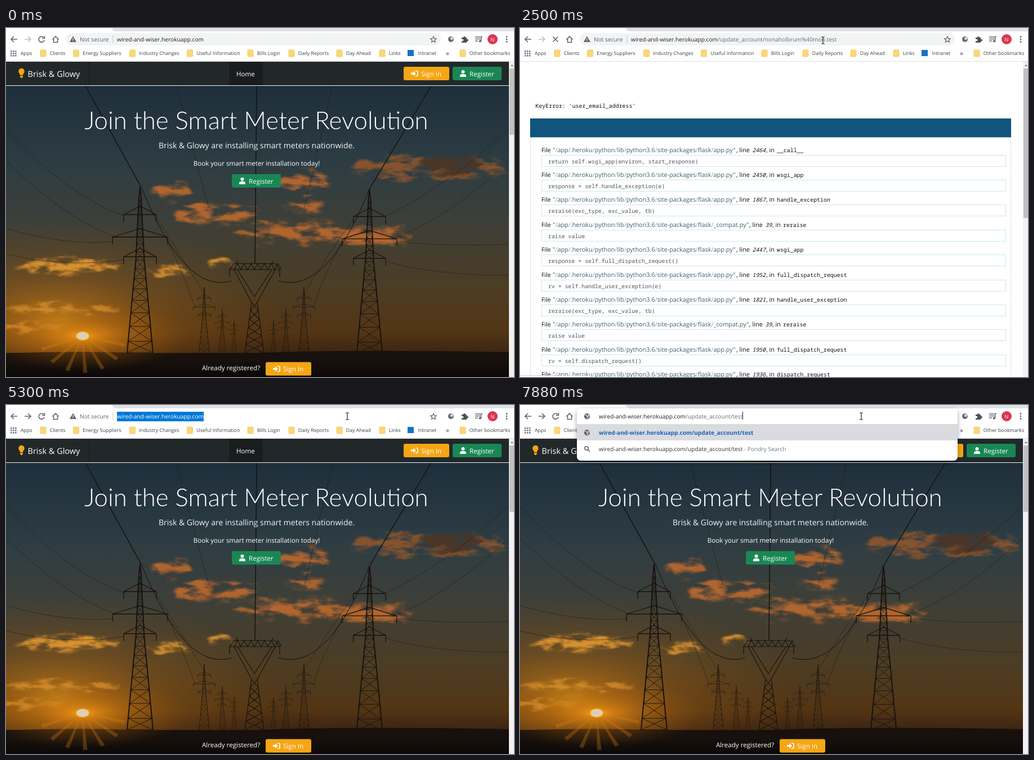
An HTML page for the animation above (8000 ms loop, 902x621 px).

```html
<!DOCTYPE html>
<html lang="en">
<head>
<meta charset="utf-8">
<title>Browser session</title>
<style>
html, body { margin: 0; width: 100%; height: 100%; overflow: hidden; background: #fff; }
svg { display: block; }
text { font-family: "Open Sans", "Noto Sans", sans-serif; text-rendering: geometricPrecision; white-space: pre; }
.mono { font-family: "Noto Sans Mono", "DejaVu Sans Mono", monospace; }
.title { font-family: Lato, "Open Sans", sans-serif; font-weight: 300; }
.line { fill: none; stroke: #5f6368; stroke-width: 1.6; }
</style>
</head>
<body>
<svg id="stage" width="902" height="621" viewBox="0 0 902 621">
  <defs>
    <linearGradient id="sky" x2="0" y2="1">
      <stop offset="0" stop-color="#1e2f3c"/><stop offset=".3" stop-color="#2e3d43"/>
      <stop offset=".52" stop-color="#3e3f38"/><stop offset=".75" stop-color="#4c3d25"/>
      <stop offset=".92" stop-color="#533514"/><stop offset="1" stop-color="#3a2412"/>
    </linearGradient>
    <linearGradient id="ground" x2="0" y2="1">
      <stop offset="0" stop-color="#1e150f"/><stop offset="1" stop-color="#0b0908"/>
    </linearGradient>
    <radialGradient id="glow">
      <stop offset="0" stop-color="#ffb01c"/><stop offset=".15" stop-color="#ee8f12" stop-opacity=".8"/>
      <stop offset=".45" stop-color="#c9740f" stop-opacity=".42"/><stop offset="1" stop-color="#94540c" stop-opacity="0"/>
    </radialGradient>
    <filter id="ragged" x="-20%" y="-80%" width="140%" height="260%">
      <feTurbulence type="fractalNoise" baseFrequency=".025 .06" numOctaves="4" seed="4" result="noise"/>
      <feColorMatrix in="noise" values="0 0 0 0 0  0 0 0 0 0  0 0 0 0 0  0 0 4 0 -1.2" result="wisps"/>
      <feGaussianBlur in="SourceGraphic" stdDeviation="3"/>
      <feDisplacementMap in2="noise" scale="32" xChannelSelector="R" yChannelSelector="G"/>
      <feComposite in2="wisps" operator="in"/>
    </filter>
    <filter id="shadow" x="-5%" y="-20%" width="110%" height="150%">
      <feDropShadow dx="0" dy="3" stdDeviation="4" flood-opacity=".35"/>
    </filter>
    <clipPath id="view"><rect y="60" width="893" height="561"/></clipPath>
  </defs>
  <g id="home" clip-path="url(#view)"></g>
  <g id="trace" clip-path="url(#view)"></g>
  <g id="status"></g>
  <g id="chrome"></g>
  <g id="bar"></g>
  <g id="cursor">
    <path id="arrow" d="M0 0V12.5L3 9.8 4.8 14 6.8 13.1 5 9.1H9Z" fill="#fff" stroke="#222" stroke-width=".9"/>
    <path id="beam" d="M-3-6H3M0-6V6M-3 6H3" stroke="#222" stroke-width="1.2"/>
  </g>
</svg>
<script>
const $ = id => document.getElementById(id);
const LOOP = 8000;
const HOST = 'wired-and-wiser.herokuapp.com';
const ACCOUNT = HOST + '/update_account/';
const FULL = ACCOUNT + 'nonaholbrum%40mon.test';
const BRAND = 'Brisk &amp; Glowy';

const label = (x, y, s, size, fill, extra = '') =>
  `<text x="${x}" y="${y}" font-size="${size}" fill="${fill}" ${extra}>${s}</text>`;
const box = (x, y, w, h, fill, r = 0, extra = '') =>
  `<rect x="${x}" y="${y}" width="${w}" height="${h}" rx="${r}" fill="${fill}" ${extra}/>`;
const path = (d, extra) => `<path d="${d}" ${extra}/>`;
const oval = (x, y, rx, ry, extra = '') => `<ellipse cx="${x}" cy="${y}" rx="${rx}" ry="${ry}" ${extra}/>`;
const middle = 'text-anchor="middle"';

// Home page
const person = '<circle cx="5.5" cy="3" r="3"/><path d="M0 12V10.5Q0 7 3.5 7H7.5Q11 7 11 10.5V12Z"/>';
const enter = '<path d="M0 4.5H4V1.5L9 6 4 10.5V7.5H0Z"/><path d="M8 1.5H10.5Q12 1.5 12 3V9Q12 10.5 10.5 10.5H8" fill="none" stroke="#fff" stroke-width="1.7"/>';
function button(x, y, kind) {
  const sign = kind === 'Sign In';
  return box(x, y, sign ? 81 : 87, 24, sign ? '#f5a614' : '#198754', 3) +
    `<g transform="translate(${x + 13} ${y + 6})" fill="#fff">${sign ? enter : person}</g>` +
    label(x + (sign ? 31 : 30), y + 16.5, kind, 11.6, '#fff');
}

function pylon(cx, top, k) {
  const half = y => y < 125 ? 1 + y * .05 : 7 + (y - 125) * .094;
  let left = 'M0 0', right = 'M0 0', lace = '', y = 20;
  while (y < 295) {
    const next = Math.min(295, y + 8 + half(y));
    const a = half(y), b = half(next);
    lace += `M${-a} ${y}L${b} ${next}M${a} ${y}L${-b} ${next}M${-b} ${next}H${b}`;
    left += `L${-a} ${y}`;
    right += `L${a} ${y}`;
    y = next;
  }
  let arms = '';
  for (const [ay, w] of [[49, 29], [89, 49], [124, 29]])
    arms += `M${-w} ${ay}H${w}L0 ${ay - 15}ZM${-w} ${ay}V${ay + 13}M${w} ${ay}V${ay + 13}`;
  return `<g transform="translate(${cx} ${top}) scale(${k})" fill="none" stroke="#17120f">` +
    path(`${left}L-23 295${right}L23 295`, 'stroke-width="2"') +
    path(lace, 'stroke-width=".9"') + path(arms, 'stroke-width="1.3"') + '</g>';
}

function gantry() {
  const brace = (y, w, ny, nw) => `M${441 - w} ${y}L${441 + nw} ${ny}M${441 + w} ${y}L${441 - nw} ${ny}`;
  let d = 'M397 430H486L478 419H405ZM405 430L436 488 424 578M478 430L446 488 458 578M411 430L441 478 472 430M397 430V443M486 430V443M410 419V414M473 419V414';
  for (let x = 405; x < 478; x += 12) d += `M${x} 430L${x + 6} 419L${x + 12} 430`;
  for (let i = 0; i < 6; i++) d += brace(488 + i * 15, 5 + i * 2, 503 + i * 15, 7 + i * 2);
  return path(d, 'fill="none" stroke="#17120f" stroke-width="1.2"');
}

function drawHome() {
  const clouds = [
    [288, 288, 36, 12], [372, 329, 74, 17], [530, 317, 34, 10], [528, 271, 48, 16], [505, 364, 100, 15], [655, 372, 62, 17]
  ].map(c => oval(...c)).join('');
  const lit = [[110, 424, 90, 10], [290, 433, 36, 6], [100, 500, 105, 6], [378, 416, 22, 6], [30, 533, 75, 5]]
    .map(c => oval(...c)).join('');
  const wires = 'M0 180Q110 300 212 335M0 237Q100 335 191 371M0 357Q110 388 191 380M0 402Q110 428 210 412' +
    'M892 180Q780 285 673 335M892 237Q790 335 694 372M892 385Q790 390 694 380M892 440Q760 440 674 415' +
    'M269 340Q320 420 350 470M288 380Q320 450 335 495M617 340Q560 420 531 470M597 380Q560 450 546 495' +
    'M302 103L360 320M580 103L530 320';
  let rays = '';
  for (let a = .25; a < 3; a += .42)
    rays += `M136 548L${136 + 78 * Math.cos(a - .05)} ${548 + 66 * Math.sin(a - .05)}L${136 + 78 * Math.cos(a + .05)} ${548 + 66 * Math.sin(a + .05)}Z`;
  $('home').innerHTML =
    box(0, 103, 893, 477, 'url(#sky)') +
    oval(90, 520, 400, 180, 'fill="url(#glow)" opacity=".6"') +
    `<g filter="url(#ragged)"><g fill="#b0652e">${clouds}</g><g fill="#d9912f">${lit}</g>` +
    oval(752, 249, 138, 21, 'fill="#85532f"') + oval(785, 243, 60, 16, 'fill="#4c3428"') + '</g>' +
    box(0, 578, 893, 43, 'url(#ground)') +
    path('M0 579Q120 574 230 578T480 577T893 577V590H0Z', 'fill="#17100c"') +
    oval(136, 548, 190, 62, 'fill="url(#glow)" opacity=".85"') +
    path(rays, 'fill="#d97f12" opacity=".3"') +
    oval(136, 548, 11, 7, 'fill="#d9cfbd" stroke="#ffc03a" stroke-width="1.5"') +
    path(wires, 'fill="none" stroke="#15130f" stroke-width=".8" opacity=".6"') +
    path('M141 103L241 285M755 103L645 287M445 103L442 419', 'stroke="#11100f" stroke-width="1.4"') +
    path('M241 285Q318 475 400 450M645 287Q570 475 484 450', 'fill="none" stroke="#11100f"') +
    pylon(405, 520, .2) + pylon(475, 520, .2) + pylon(384, 500, .27) + pylon(497, 500, .27) +
    pylon(352, 461, .4) + pylon(529, 461, .4) + pylon(238, 283, 1) + pylon(645.5, 287, .99) + gantry() +
    label(444.5, 180, 'Join the Smart Meter Revolution', 43.8, '#fff', `class="title" ${middle}`) +
    label(445, 214, BRAND + ' are installing smart meters nationwide.', 14, '#f4f5f5', middle) +
    label(445, 245, 'Book your smart meter installation today!', 11.6, '#fff', middle) +
    button(401, 260, 'Register') +
    label(348, 609, 'Already registered?', 11.6, '#fff') + button(461, 594.5, 'Sign In') +
    box(0, 60, 893, 42, '#22282a') + box(0, 102, 893, 1, '#f2f2f2') +
    box(147, 60, 1, 42, '#15191a') + box(396, 60, 60, 42, '#191d1e') +
    path('M25 84Q25 82 23.5 80.5A5.3 5.3 0 1 1 31.5 80.5Q30 82 30 84ZM25 85H30V87L28.5 89H26.5L25 87Z', 'fill="#f5a614"') +
    label(38.5, 87, BRAND, 14.5, '#fff') + label(409, 86, 'Home', 11.6, '#fff') +
    button(706, 69, 'Sign In') + button(793, 69, 'Register');
}

// Error page
const FRAMES = [
  ['app', 2464, '__call__', 'return self.wsgi_app(environ, start_response)'],
  ['app', 2450, 'wsgi_app', 'response = self.handle_exception(e)'],
  ['app', 1867, 'handle_exception', 'reraise(exc_type, exc_value, tb)'],
  ['_compat', 39, 'reraise', 'raise value'],
  ['app', 2447, 'wsgi_app', 'response = self.full_dispatch_request()'],
  ['app', 1952, 'full_dispatch_request', 'rv = self.handle_user_exception(e)'],
  ['app', 1821, 'handle_user_exception', 'reraise(exc_type, exc_value, tb)'],
  ['_compat', 39, 'reraise', 'raise value'],
  ['app', 1950, 'full_dispatch_request', 'rv = self.dispatch_request()'],
  ['app', 1936, 'dispatch_request', 'return self.view_functions[rule.endpoint](**req.view_args)']
];
function drawTrace(ready) {
  const rows = FRAMES.map(([file, num, fn, code], i) => {
    const y = (ready ? 204.3 : 220.7) + i * 44.38;
    const dx = file === 'app' ? 0 : 23, dn = num < 100 ? -12 : 0;
    const name = `"/app/.heroku/python/lib/python3.6/site-packages/flask/${file}.py"`
      .replaceAll('/', '<tspan fill="#8ba0a8">/</tspan>');
    return label(38, y, 'File', 10.6, '#111') + label(58, y, name, 10.9, '#43606c') +
      label(384 + dx, y, ', line', 10.9, '#111') +
      label(412.5 + dx, y, num, 9.9, '#111', 'class="mono" font-style="italic"') +
      label(437 + dx + dn, y, ', in', 10.9, '#111') +
      label(456 + dx + dn, y, fn, 9.9, '#111', 'class="mono"') +
      box(38.5, Math.round(y + 5) + .5, 824, 20, '#fff', 0, 'stroke="#cfe6e8"') +
      label(50, y + 20, code, 9.9, '#555', 'class="mono"');
  }).join('');
  const top = ready ? 150 : 161, h = ready ? 28 : 33.5;
  $('trace').innerHTML = box(0, 60, 893, 561, '#fff') +
    box(18.5, top, 853, 500, '#fff', 0, 'stroke="#dfe3e5"') + box(18, top, 854, h, '#11557c') +
    label(27.5, ready ? 131 : 142, "KeyError: 'user_email_address'", 9.9, '#111', 'class="mono"') + rows +
    (ready ? label(18, 106, 'KeyError', 27.6, '#111') +
      label(25, 168.5, 'Traceback', 11.6, '#fff', 'font-weight="600"') +
      label(85, 168.5, '(most recent call last)', 12.2, '#b5d3e2') : '');
}

// Browser frame
const FOLDERS = { 61: 'Clients', 119.5: 'Energy Suppliers', 219.5: 'Industry Changes', 321.5: 'Useful Information', 429: 'Bills Login', 502: 'Daily Reports', 587: 'Day Ahead', 663: 'Links', 806: 'Other bookmarks' };
function drawChrome(s) {
  let apps = '';
  for (let i = 0; i < 9; i++)
    apps += box(8 + i % 3 * 4, 40 + Math.floor(i / 3) * 4, 2.6, 2.6, ['#e0483e', '#3f7de0', '#45a35a'][(i + (i / 3 | 0)) % 3]);
  const folders = Object.entries(FOLDERS).map(([x, name]) =>
    box(x, 39, 10, 12, '#fbd775', 1, 'stroke="#e8bd4b" stroke-width=".6"') +
    label(+x + 16.8, 48.2, name, 8.8, '#3c4043')).join('');
  const thumb = s.page === 'home' ? 118 : s.page === 'raw' ? 266 : 322;
  $('chrome').innerHTML = box(0, 0, 902, 59, '#fff') +
    path('M188 0H902V6H196Q190 6 188 0Z', 'fill="#dee1e6"') + box(0, 59, 902, 1, '#dcdee1') +
    box(893, 60, 9, 561, '#f1f1f1') + box(894, 72, 8, thumb, '#c1c1c1') + path('M896 68L898.5 65 901 68Z', 'fill="#777"') +
    (s.hover ? '<circle cx="13.5" cy="20" r="11" fill="#dadce0"/>' : '') +
    path('M20 20H9M14 15L9 20 14 25', 'class="line"') +
    path('M33 20H44M39 15L44 20 39 25', `class="line" style="stroke:${s.forward ? '#5f6368' : '#bdc1c6'}"`) +
    (s.loading ? path('M58.5 15.5L67.5 24.5M67.5 15.5L58.5 24.5', 'class="line"')
      : path('M67 17A5 5 0 1 0 68 21.5M68.5 14V18.5H64', 'class="line"')) +
    path('M82.5 20.5L88 15 93.5 20.5M84.5 19.5V25.5H91.5V19.5', 'class="line"') +
    '<circle cx="790" cy="20" r="5" fill="#666a70"/><circle cx="791.5" cy="18.5" r="2.6" fill="#d4d6d9"/>' +
    path('M809 17H812A2 2 0 1 1 816 17H818V20A2 2 0 1 1 818 23.5V26H809V23A2 2 0 1 0 809 20Z', 'fill="#4c5055"') +
    path('M833 16H842M833 19.5H842M833 23H838M843.5 24V15.5H846', 'class="line"') +
    '<circle cx="841.7" cy="23.5" r="2" fill="#5f6368"/><circle cx="864" cy="20" r="9" fill="#dc3550"/>' +
    label(864, 23.5, 'N', 9, '#fff', middle) +
    [15.5, 20, 24.5].map(y => `<circle cx="889" cy="${y}" r="1.4" fill="#5f6368"/>`).join('') +
    apps + label(26, 48.2, 'Apps', 8.8, '#3c4043') + folders +
    box(713, 39, 11, 11, '#1473c4') + label(731.5, 48.2, 'Intranet', 8.8, '#3c4043') + label(781, 48.5, '»', 12, '#3c4043');
}

const globe = y => `<circle cx="119" cy="${y}" r="5.2" fill="#5f6368"/>` +
  path(`M115 ${y - 2}Q118 ${y - 3} 118.5 ${y}L121 ${y + 1} 119 ${y + 4}M121 ${y - 4}Q120 ${y - 1} 124 ${y - 1}`, 'fill="none" stroke="#fff" stroke-width="1.2"');
const terminal = y => box(113, y - 5, 12.5, 10, '#1f3a52', 1) + path(`M115 ${y - 2.5}L117.5 ${y - .5} 115 ${y + 1.5}`, 'fill="none" stroke="#fff" stroke-width=".9"');

function drawBar(s) {
  const x = s.edit ? 140 : 197, sel = s.sel ?? s.url.length;
  const tone = (a, b, fill) => `<tspan fill="${fill}">${s.url.slice(a, Math.max(a, b))}</tspan>`;
  const text = label(x, 24, tone(0, Math.min(29, sel), '#202124') + tone(29, sel, '#6a6e73') + tone(sel, s.url.length, '#fff'), 10.2, '#202124', 'id="url"');
  const icon = s.known ? terminal : globe;
  let out = '';
  if (s.drop) {
    const dark = '#303236';
    out += box(101, 6, 676, 93, '#fff', 7, 'filter="url(#shadow)"') + box(101, 34, 676, 29, '#dadbde') + icon(49) +
      (s.known
        ? label(140, 52.7, `KeyError: 'user_email_address' // Werkzeug Debugger - <tspan font-weight="700" fill="#1f5fc0">${FULL.slice(0, 56)}...</tspan>`, 10.2, dark) +
          path('M758.5 45.5L765.5 52.5M765.5 45.5L758.5 52.5', 'class="line"')
        : label(140, 52.7, s.url, 10.2, '#1f5fc0', 'font-weight="700"')) +
      path('M121 80L124 83M121.5 77A3.3 3.3 0 1 1 114.9 77A3.3 3.3 0 1 1 121.5 77', 'class="line"') +
      label(140, 82.2, `${s.url}<tspan fill="#74787d"> - Pondry Search</tspan>`, 10.2, dark);
  } else if (!s.edit && s.sel === undefined) out += box(106, 9, 666, 22, '#f1f3f4', 11);
  if (s.edit) out += icon(20);
  else out += path('M119 14.5L125 25H113Z', 'fill="#5f6368"') + box(118.4, 18, 1.2, 3.6, '#fff') + box(118.4, 22.4, 1.2, 1.2, '#fff') +
    label(131, 24, 'Not secure', 10.2, '#5f6368') + box(189.5, 13, 1, 14, '#c4c7cb') +
    path('M759 15L760.5 18.7 764.3 19 761.4 21.5 762.3 25.3 759 23.2 755.7 25.3 756.6 21.5 753.7 19 757.5 18.7Z', 'class="line" style="stroke-width:1.2"');
  $('bar').innerHTML = out + '<g id="mark"></g>' + text;
  const url = $('url');
  const upTo = n => x + (n ? url.getSubStringLength(0, n) : 0);
  if (s.sel !== undefined) $('mark').innerHTML = box(upTo(sel), 12, upTo(s.url.length) - upTo(sel), 17, '#0078d7');
  else if (s.caret) $('mark').innerHTML = box(Math.round(upTo(s.url.length)), 12, 1, 14, '#202124');
}

// Each step changes only the listed fields
const base = { page: 'home', url: HOST, edit: false, drop: false, caret: false, sel: undefined, known: false, loading: false, forward: false, hover: false, status: 0 };
const pick = { edit: true, drop: true, caret: true, sel: undefined };
const STEPS = [
  [0, {}],
  [710, { sel: 0 }],
  [950, { ...pick, url: FULL }],
  [1260, { drop: false }],
  [1860, { caret: false }],
  [2330, { caret: true }],
  [2420, { edit: false, caret: false, loading: true }],
  [2490, { page: 'raw', status: 127 }],
  [2660, { page: 'ready', loading: false, status: 0 }],
  [3820, { hover: true }],
  [3980, { page: 'home', url: HOST, forward: true, status: 297 }],
  [4700, { hover: false, status: 0 }],
  [5300, { sel: 0 }],
  [5540, { ...pick, url: FULL, known: true }],
  [6240, { sel: 63 }],
  [6700, { sel: 57 }],
  [6930, { sel: 45 }],
  [7730, { sel: undefined, known: false, url: ACCOUNT + 'te' }],
  [7800, { url: ACCOUNT + 'tes' }],
  [7880, { url: ACCOUNT + 'test' }]
];
let state = base;
const TIMELINE = STEPS.map(([at, change]) => [at, state = { ...state, ...change }]);

const MOUSE = [[50, 525, 436], [610, 541, 60], [710, 538, 22], [2950, 538, 22], [3690, -3, 13], [3850, -3, 13], [4530, 179, 46], [5180, 606, 20], [LOOP, 606, 20]];
function moveCursor(t) {
  const q = Math.max(50, 4530 + Math.floor((t - 4530) / 80) * 80);
  const i = MOUSE.findIndex((k, n) => n && q <= k[0]);
  const [t0, x0, y0] = MOUSE[i - 1], [t1, x1, y1] = MOUSE[i];
  const u = (q - t0) / (t1 - t0), e = u * u * (3 - 2 * u);
  const x = x0 + (x1 - x0) * e, y = y0 + (y1 - y0) * e;
  const typing = x > 130 && y < 31;
  $('cursor').setAttribute('transform', `translate(${x} ${y})`);
  $('cursor').style.display = t < 70 ? 'none' : '';
  $('beam').style.display = typing ? '' : 'none';
  $('arrow').style.display = typing ? 'none' : '';
  $('halo').style.display = t >= 3700 && t < 3900 ? '' : 'none';
}

drawHome();
$('cursor').insertAdjacentHTML('beforebegin', '<circle id="halo" cx="-1" cy="11" r="11" fill="#fff04a" opacity=".75"/>');
let shown;
const start = performance.now();
function render() {
  const t = (performance.now() - start) % LOOP;
  const s = TIMELINE.findLast(([at]) => at <= t)[1];
  if (s !== shown) {
    shown = s;
    $('home').style.display = s.page === 'home' ? '' : 'none';
    $('trace').style.display = s.page === 'home' ? 'none' : '';
    if (s.page !== 'home') drawTrace(s.page === 'ready');
    $('status').innerHTML = s.status ? box(-3, s.status < 200 ? 618.5 : 619.5, s.status + 3, 20, '#fff', 2, 'stroke="#c8cacd"') : '';
    drawChrome(s);
    drawBar(s);
  }
  moveCursor(t);
  requestAnimationFrame(render);
}
render();
</script>
</body>
</html>
```
